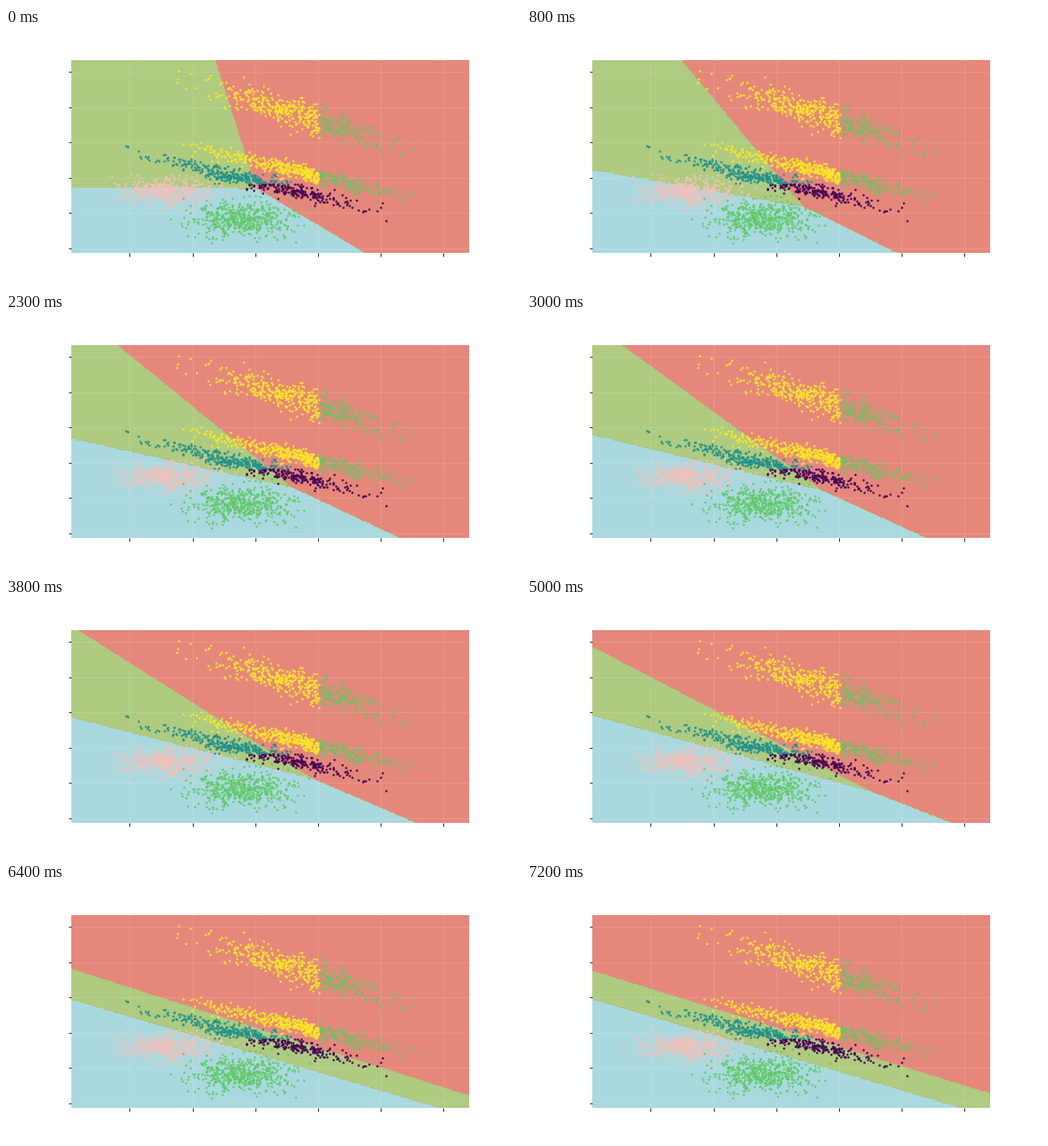
A matplotlib script that plays this animation: 576x288 px, repeating every 7.3 s.

```python
import numpy as np
import matplotlib.pyplot as plt
from matplotlib.animation import FuncAnimation

W, H, DPI = 576, 288, 72
LEFT, RIGHT, TOP, BOTTOM = 73, 518, 36, 252
FRAMES, INTERVAL = 73, 100
PIVOT = 280

BLUE, GREEN, RED = "#a9d9df", "#aecb80", "#e5887b"
BLUE_EDGE, RED_EDGE = "#b0bf85", "#c0a87a"
YELLOW, LEAF, PINK = "#fde725", "#5ec962", "#f4c0b8"
TEAL, PURPLE = "#21918c", "#440154"

rng = np.random.default_rng(7)


def normal(n, limit=3):
    """Gaussian samples without far outliers."""
    values = rng.normal(size=2 * n)
    return values[np.abs(values) < limit][:n]


def cloud(n, cx, cy, sx, sy, slope=0):
    """Gaussian cloud stretched along a sloping line."""
    dx = sx * normal(n)
    return np.column_stack([cx + dx, cy + slope * dx + sy * normal(n)])


def dots(points, color, alpha=1):
    ax.scatter(points[:, 0], points[:, 1], s=6, c=color, alpha=alpha,
               linewidths=0, zorder=3)


def split_dots(points, axis, limit, below, above):
    """Colour a cloud by the side of a straight cut it lies on."""
    is_above = points[:, axis] >= limit
    dots(points[is_above], *above)
    dots(points[~is_above], *below)


def regions(frame):
    """Class of every grid point: 0 blue, 1 green, 2 red."""
    fast, slow = np.exp(-frame / 4), np.exp(-frame / 15)

    # Slopes settle quickly at first, then drift
    high = np.interp(frame, [15, 38, 48, 64, 72],
                     [0.90, 0.634, 0.55, 0.319, 0.309]) + 2.23 * fast
    low = np.interp(frame, [15, 30, 64], [0.203, 0.243, 0.295]) - 0.2 * fast
    pivot_y = 161.5 + 15.5 * fast
    left_y = 129 + 49.5 * slow
    mix = 0.48 - 0.29 * slow

    upper = pivot_y + high * (gx - PIVOT)
    lower = left_y + low * (gx - LEFT)

    # Right of the crossing, blue meets red along a line between both slopes
    meet_x = (left_y - low * LEFT - pivot_y + high * PIVOT) / (high - low)
    meet_y = left_y + low * (meet_x - LEFT)
    right = meet_y + (low + mix * (high - low)) * (gx - meet_x)
    edge = np.where(gx < meet_x, lower, right)
    return np.where(gy > edge, 0, np.where(gy > upper, 1, 2))


fig = plt.figure(figsize=(W / DPI, H / DPI), dpi=DPI, facecolor="white")
ax = fig.add_axes([LEFT / W, 1 - BOTTOM / H,
                   (RIGHT - LEFT) / W, (BOTTOM - TOP) / H])
ax.set(xlim=(LEFT, RIGHT), ylim=(BOTTOM, TOP),
       xticks=138.3 + 70.2 * np.arange(6), yticks=48.9 + 39.6 * np.arange(6))
ax.tick_params(length=3.5, width=0.8, labelbottom=False, labelleft=False)
ax.spines[:].set_visible(False)
for x in ax.get_xticks():
    ax.axvline(x, color="white", alpha=0.15, lw=0.8, zorder=2)
for y in ax.get_yticks():
    ax.axhline(y, color="white", alpha=0.15, lw=0.8, zorder=2)

gx, gy = np.meshgrid(np.linspace(LEFT, RIGHT, 319),
                     np.linspace(TOP, BOTTOM, 155))

dots(cloud(420, 182, 183, 29, 8), PINK)
dots(cloud(490, 263, 214, 28, 10), LEAF, 0.9)
for points in (cloud(500, 328, 97, 50, 8.5, 0.32),
               cloud(500, 328, 161, 54, 4.8, 0.235)):
    split_dots(points, 0, 350, (YELLOW,), (LEAF, 0.75))
split_dots(cloud(500, 274, 171, 56, 4.5, 0.23), 1, 174.5, (TEAL,), (PURPLE,))

fill = None


def draw(frame):
    global fill
    if fill is not None:
        fill.remove()
    fill = ax.contourf(gx, gy, regions(frame),
                       levels=[-0.5, 0.25, 0.75, 1.25, 1.75, 2.5],
                       colors=[BLUE, BLUE_EDGE, GREEN, RED_EDGE, RED],
                       zorder=1)
    return [fill]


def reset():
    return draw(0)


anim = FuncAnimation(fig, draw, frames=FRAMES, init_func=reset,
                     interval=INTERVAL, repeat=True, repeat_delay=0)
plt.show()
```
